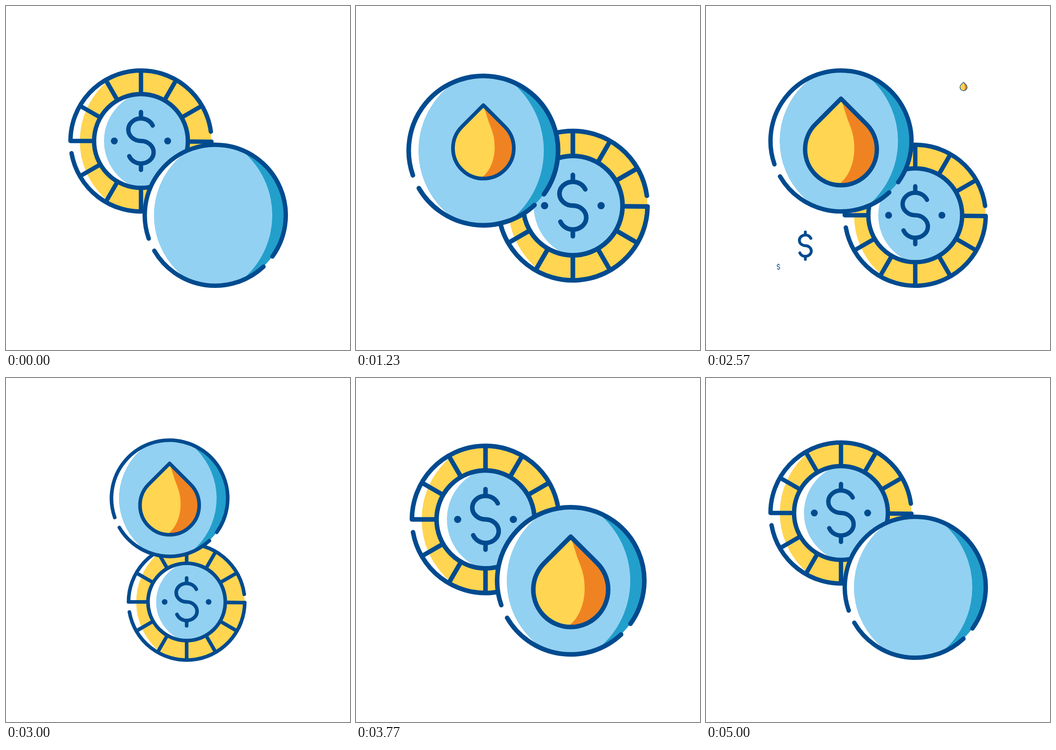
An HTML page that plays this animation: 748 px wide and 748 px high, repeating every 5.03 s.

```html
<!DOCTYPE html>
<html lang="en">
<head>
<meta charset="utf-8">
<title>Coin exchange</title>
<style>
  html, body { margin: 0; width: 100%; height: 100%; overflow: hidden; background: #fff; }
  svg { display: block; width: 100vw; height: 100vh; }
  .line { fill: none; stroke: #004b8f; stroke-width: 9.5; stroke-linecap: round; stroke-linejoin: round; }
  .bold { stroke-width: 13; }
  .blue { fill: #93d1f2; }
  .teal { fill: #239fcb; }
  .gold { fill: #ffd551; }
  .orange { fill: #f08321; }
  .navy { fill: #004b8f; }
  .white { fill: #fff; }
</style>
</head>
<body>
<svg viewBox="0 0 748 748">
  <defs>
    <clipPath id="face"><circle r="153"/></clipPath>
    <clipPath id="core"><circle r="102"/></clipPath>
    <clipPath id="lit"><circle cx="37" r="170"/></clipPath>
    <path id="dollar" d="M25.5 -33.5C21 -43 11 -49 0 -49A27.5 24.5 0 0 0 0 0A27.5 24.5 0 0 1 0 49C-11 49 -21 43 -25.5 33M0 -63V-49M0 49V63"/>
    <g id="drop">
      <path class="gold" stroke="none" d="M0 -92L-55 -37A78 78 0 1 0 55 -37Z"/>
      <path class="orange" stroke="none" d="M0 -92L14 -48C20 -32 29 -15 29 16C29 50 15 82 -7 95.5A78 78 0 0 0 55 -37Z"/>
      <path d="M0 -92L-55 -37A78 78 0 1 0 55 -37Z"/>
    </g>
  </defs>

  <g id="dollarCoin">
    <circle class="white" r="153"/>
    <g clip-path="url(#face)"><circle class="gold" cx="37" r="170"/></g>
    <circle class="white" r="102"/>
    <g clip-path="url(#core)"><circle class="blue" cx="28.5" r="109"/></g>
    <path class="line" id="rim"/>
    <circle class="line" r="102"/>
    <use class="line" href="#dollar"/>
    <circle class="navy" cx="-58" r="7.5"/>
    <circle class="navy" cx="58" r="7.5"/>
  </g>

  <g id="dropCoin">
    <circle class="white" r="153"/>
    <g clip-path="url(#face)">
      <circle class="teal" cx="37" r="170"/>
      <g clip-path="url(#lit)"><circle class="blue" cx="-58.7" r="182.7"/></g>
    </g>
    <path class="line" id="edge"/>
    <use class="line" href="#drop" id="bigDrop"/>
  </g>

  <g id="sparks"></g>
</svg>

<script>
const LOOP = 5030, HALF = 2500;
const MID = 374.25, ORBIT = 114.2, RIM = 153.3;
const $ = id => document.getElementById(id);

const ease = u => u * u * (3 - 2 * u);
// Eased value from a list of [time, value] keys.
function at(keys, t) {
  if (t <= keys[0][0]) return keys[0][1];
  for (let i = 1; i < keys.length; i++) {
    const [t0, v0] = keys[i - 1], [t1, v1] = keys[i];
    if (t < t1) return v0 + (v1 - v0) * ease((t - t0) / (t1 - t0));
  }
  return keys[keys.length - 1][1];
}

const polar = (r, deg) => {
  const a = deg * Math.PI / 180;
  return `${(r * Math.cos(a)).toFixed(2)} ${(r * Math.sin(a)).toFixed(2)}`;
};
const arc = (from, to) =>
  `M${polar(RIM, from)}A${RIM} ${RIM} 0 ${to - from > 180 ? 1 : 0} 1 ${polar(RIM, to)}`;

let rim = arc(180, 352.4) + arc(0.6, 170);
for (let a = 30; a <= 360; a += 30) {
  const deg = a === 360 ? 0.7 : a;
  rim += `M${polar(105, deg)}L${polar(a % 180 ? 150 : RIM, deg)}`;
}
$('rim').setAttribute('d', rim);
$('edge').setAttribute('d', arc(160.7, 395.8) + arc(46.8, 149.8));

const turn = [[120, 0], [1454, 180], [2620, 180], [3954, 360]];
const size = [[70, 1], [560, 0.817], [1030, 1.11], [1454, 1]];
const tilt = [[1330, 0], [1630, -14], [2000, 8], [2500, 0]];
const pop = [[70, 0], [800, 1.15], [1230, 0.8], [1600, 1], [4160, 1], [5015, 0]];

// Dollar signs drift up, the small drop drifts down.
const sparks = [
  { shape: 'dollar', x: 157.5, y: 608, t: 1770, v: -0.051, keys: [[1430, 0], [1770, 0.66], [2200, 0.66], [2693, 0]] },
  { shape: 'dollar', x: 275, y: 652, t: 1770, v: -0.057, keys: [[1500, 0], [1900, 0.42], [2050, 0.42], [2450, 0]] },
  { shape: 'dollar', x: 216, y: 578, t: 1770, v: -0.071, keys: [[1760, 0], [2150, 0.55], [2500, 0.55], [2800, 0]] },
  { shape: 'drop', x: 560, y: 108, t: 1630, v: 0.071, keys: [[1450, 0], [1650, 0.2], [2300, 0.2], [2840, 0]] }
];
for (const s of sparks) {
  s.el = document.createElementNS('http://www.w3.org/2000/svg', 'use');
  s.el.setAttribute('href', '#' + s.shape);
  s.el.setAttribute('class', 'line bold');
  $('sparks').append(s.el);
}

// The second burst plays faster, so that it ends with the loop.
function sparkTime(shape, t) {
  if (t < 3500) return t;
  if (shape === 'drop') return 1450 + (t - 4290) * 2;
  const r = t - HALF;
  return r < 1850 ? r : 1850 + (r - 1850) * 1.5;
}

function place(el, deg, scale, spin, pivot) {
  const a = deg * Math.PI / 180;
  const x = MID + ORBIT * Math.cos(a), y = MID + ORBIT * Math.sin(a);
  el.setAttribute('transform', `translate(${x} ${y}) scale(${scale}) rotate(${spin} ${pivot} 0)`);
}

function draw(t) {
  const half = t < HALF ? t : t - HALF;
  const deg = at(turn, t) - 135, scale = at(size, half), spin = at(tilt, half);
  place($('dollarCoin'), deg, scale, spin, -25);
  place($('dropCoin'), deg + 180, scale, spin, 0);

  const p = at(pop, t);
  $('bigDrop').setAttribute('transform', `translate(0 ${-98 * (1 - p)}) scale(${p})`);
  $('bigDrop').style.display = p > 0 ? '' : 'none';

  for (const s of sparks) {
    const r = sparkTime(s.shape, t), k = at(s.keys, r);
    const low = s.shape === 'drop' && t > 3500 ? 15 : 0;
    s.el.style.display = k > 0 ? '' : 'none';
    s.el.setAttribute('transform', `translate(${s.x} ${s.y + low + s.v * (r - s.t)}) scale(${k})`);
  }
}

function tick() {
  draw(performance.now() % LOOP);
  requestAnimationFrame(tick);
}
tick();
</script>
</body>
</html>
```
